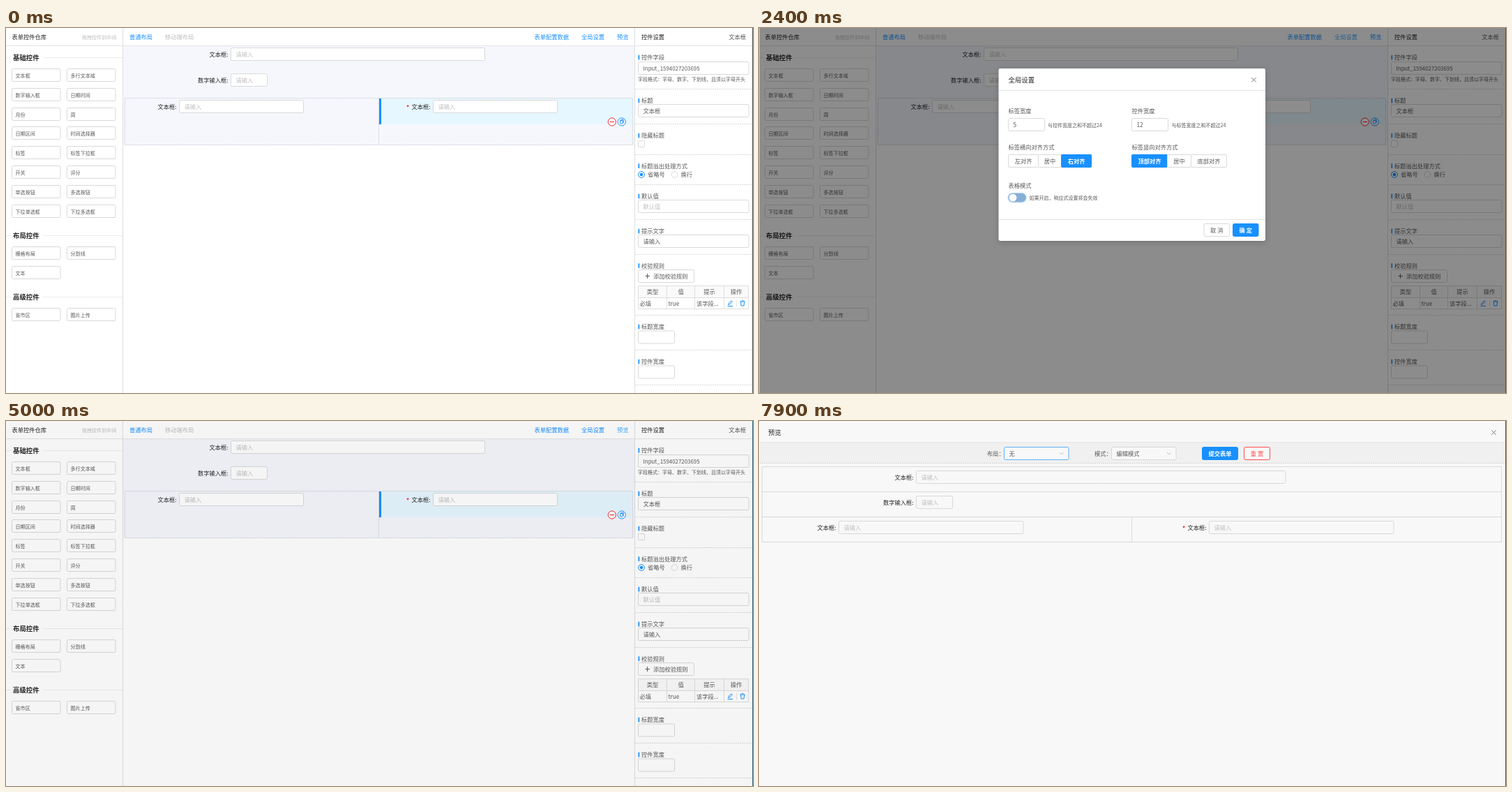
An HTML page with a canvas that plays this animation: 1071 px wide and 523 px high, repeating every 8000 ms.

```html
<!DOCTYPE html>
<html lang="zh-CN">
<head>
<meta charset="utf-8">
<title>表单设计器</title>
<style>
  html, body { margin: 0; width: 100%; height: 100%; overflow: hidden; background: #fff; }
  canvas { display: block; }
</style>
</head>
<body>
<canvas id="stage" width="1071" height="523"></canvas>
<script>
const W = 1071, H = 523, LOOP = 8000, STEP = 100;
const FONT = "'Noto Sans CJK SC','Noto Sans CJK','Noto Sans',sans-serif";
const BLUE = '#1890ff', RED = '#f5222d', BORDER = '#d9d9d9', LINE = '#e4e4e4';
const DARK = '#262626', TEXT = '#595959', HINT = '#bfbfbf';

const screen2d = document.getElementById('stage').getContext('2d');
const layer = Object.assign(document.createElement('canvas'), { width: W, height: H });
const layer2d = layer.getContext('2d');
let g = screen2d;

const clamp = v => Math.max(0, Math.min(1, v));
const bezier = (a, b, u) => 3 * (1 - u) ** 2 * u * a + 3 * (1 - u) * u * u * b + u ** 3;

// Ease-out-circ, cubic-bezier(.08, .82, .17, 1)
function easeOutCirc(x) {
  if (x <= 0 || x >= 1) return clamp(x);
  let lo = 0, hi = 1;
  for (let i = 0; i < 24; i++) {
    const mid = (lo + hi) / 2;
    if (bezier(.08, .17, mid) < x) lo = mid; else hi = mid;
  }
  return bezier(.82, 1, lo);
}

function mix(a, b, p) {
  const part = (hex, i) => parseInt(hex.slice(i, i + 2), 16);
  return `rgb(${[1, 3, 5].map(i => Math.round(part(a, i) + (part(b, i) - part(a, i)) * p))})`;
}

// Value of the latest [time, value] entry that has begun
const held = (t, keys) => keys.reduce((v, [at, next]) => t >= at ? next : v, 0);

function text(str, x, y, { size = 8.26, color = TEXT, align = 'left', weight = 400 } = {}) {
  g.font = `${weight} ${size}px ${FONT}`;
  g.fillStyle = color;
  g.textAlign = align;
  g.fillText(str, x, y + size * .38);
}

function rect(x, y, w, h, color) {
  g.fillStyle = color;
  g.fillRect(x, y, w, h);
}

function box(x, y, w, h, stroke = BORDER, fill, r = 2) {
  g.beginPath();
  g.roundRect(x, y, w, h, r);
  if (fill) { g.fillStyle = fill; g.fill(); }
  if (stroke) { g.strokeStyle = stroke; g.stroke(); }
}

function path(points, color, dash = []) {
  g.strokeStyle = color;
  g.setLineDash(dash);
  g.beginPath();
  points.forEach(([x, y]) => g.lineTo(x, y));
  g.stroke();
  g.setLineDash([]);
}

const hline = (x1, x2, y, color = LINE, dash) => path([[x1, y], [x2, y]], color, dash);
const vline = (x, y1, y2, color = LINE, dash) => path([[x, y1], [x, y2]], color, dash);

function circle(x, y, r, stroke, fill) {
  g.beginPath();
  g.arc(x, y, r, 0, Math.PI * 2);
  if (fill) { g.fillStyle = fill; g.fill(); }
  if (stroke) { g.strokeStyle = stroke; g.stroke(); }
}

function cross(x, y, r) {
  path([[x - r, y - r], [x + r, y + r]], '#777');
  path([[x - r, y + r], [x + r, y - r]], '#777');
}

function field(x, y, w, value, { color = TEXT, border = BORDER, fill = '#fff', pad = 7 } = {}) {
  box(x, y, w, 18, border, fill);
  if (value) text(value, x + pad, y + 9.5, { color });
}

// Label, colon and an empty input
function formItem(label, x, y, w, { required, border, fill } = {}) {
  text(label + ':', x - 4, y + 9, { color: DARK, align: 'right' });
  if (required) text('*', x - 38.5, y + 10, { color: RED, weight: 700 });
  field(x, y, w, '请输入', { color: HINT, border, fill });
}

function button(label, x, y, w, { color = TEXT, border = BORDER, fill = '#fff', h = 18, weight } = {}) {
  box(x, y, w, h, border, fill);
  text(label, x + w / 2, y + h / 2 + .3, { color, weight, align: 'center' });
}

function buttonGroup(labels, edges, y, active) {
  labels.forEach((label, i) => {
    const on = i === active;
    box(edges[i], y, edges[i + 1] - edges[i], 18, on ? BLUE : BORDER, on ? BLUE : '#fff', 1);
    text(label, (edges[i] + edges[i + 1]) / 2, y + 9.3,
      { color: on ? '#fff' : TEXT, align: 'center', weight: on ? 700 : 400 });
  });
}

const GROUPS = [
  ['基础控件', 42, 68, ['文本框', '多行文本域', '数字输入框', '日期时间', '月份', '周', '日期区间', '时间选择器',
    '标签', '标签下拉框', '开关', '评分', '单选按钮', '多选按钮', '下拉单选框', '下拉多选框']],
  ['布局控件', 297, 323, ['栅格布局', '分割线', '文本']],
  ['高级控件', 385, 411, ['省市区', '图片上传']]
];

function drawPalette() {
  text('表单控件仓库', 8.5, 13, { color: DARK, weight: 500 });
  text('拖拽控件到中间', 158.5, 13, { size: 7.08, color: HINT, align: 'right' });
  for (const [title, y, top, items] of GROUPS) {
    hline(0, 7, y + .5, '#ececec');
    hline(53, 167, y + .5, '#ececec');
    text(title, 10, y, { size: 9.4, color: DARK, weight: 700 });
    items.forEach((name, i) => {
      const x = i % 2 ? 87.5 : 8.5;
      const cy = Math.round(top + (i >> 1) * 27.8);
      box(x, cy - 9.5, 69.5, 18);
      text(name, x + 5, cy + .8, { size: 7.08 });
    });
  }
}

function drawCanvas(t) {
  const link = p => ({ color: mix(BLUE, '#40a9ff', p) });
  text('普通布局', 177, 13, link(0));
  text('移动端布局', 228, 13, { color: HINT });
  text('表单配置数据', 757.5, 13, link(held(t, [[4300, 1], [4600, 0]])));
  text('全局设置', 825, 13,
    link(held(t, [[600, .6], [700, 1], [3400, 0], [4100, 1], [4300, 0], [4600, 1], [4800, 0]])));
  text('预览', 876, 13, link(held(t, [[4800, 1]])));

  rect(168, 26, 733, 141.5, '#f5f7fd');
  rect(535, 101, 363, 37, '#e6f7ff');
  rect(535, 101, 3, 37, BLUE);
  path([[170.5, 100.5], [898.5, 100.5], [898.5, 167.5], [170.5, 167.5], [170.5, 100.5]], '#cfd2d8', [2, 1]);
  vline(534.5, 101, 167, '#cfd2d8', [2, 1]);
  formItem('文本框', 322.5, 28.5, 364);
  formItem('数字输入框', 322.5, 65.5, 52);
  formItem('文本框', 248.5, 103.5, 178);
  formItem('文本框', 612.5, 103.5, 178, { required: true });

  circle(868.8, 134.5, 5.6, RED, '#fff');
  hline(866, 872, 134.5, RED);
  circle(882.8, 134.5, 5.6, BLUE, '#fff');
  box(880.5, 132.5, 3.5, 4.5, BLUE, null, .5);
  path([[881.5, 131.3], [885.3, 131.3], [885.3, 136]], BLUE);
}

function drawSettings() {
  text('控件设置', 911, 13, { color: DARK, weight: 500 });
  text('文本框', 1061, 13, { align: 'right' });
  const sections = [['控件字段', 42], ['标题', 104], ['隐藏标题', 154], ['标题溢出处理方式', 197.5], ['默认值', 241],
    ['提示文字', 291], ['校验规则', 340.5], ['标题宽度', 428], ['控件宽度', 478]];
  for (const [name, y] of sections) {
    rect(906.5, y - 3.2, 1.7, 6.6, BLUE);
    text(name, 911, y);
  }
  for (const y of [87, 137, 181, 224, 274, 324, 411, 461, 511]) hline(902, 1070, y + .5, '#dcdcdc', [2, 1]);

  field(906.5, 48.5, 158.5, '');
  text('Input_1594027203695', 913.5, 57.8, { size: 7.9 });
  text('字段格式：字母、数字、下划线，且须以字母开头', 906, 73, { size: 7 });
  field(906.5, 109.5, 158.5, '文本框');
  box(906.5, 161.5, 9, 9, BORDER, '#fff', 1);
  circle(911, 210, 4.4, BLUE, '#fff');
  circle(911, 210, 2.3, null, BLUE);
  text('省略号', 920, 210);
  circle(958.5, 210, 4.4, BORDER, '#fff');
  text('换行', 967.5, 210);
  field(906.5, 246.5, 158.5, '默认值', { color: HINT });
  field(906.5, 296.5, 158.5, '请输入');

  box(906.5, 346.5, 80, 18, BORDER, '#fff');
  hline(916.5, 923, 355.5, TEXT);
  vline(919.5, 352, 359, TEXT);
  text('添加校验规则', 928, 355.8);

  rect(907, 370, 158, 16, '#fafafa');
  for (const y of [369.5, 386.5, 402.5]) hline(906.5, 1065, y, '#dedede');
  for (const x of [906.5, 947.5, 987.5, 1029.5, 1064.5]) vline(x, 369.5, 402.5, '#dedede');
  vline(1047.5, 390, 399);
  [['类型', 927], ['值', 967.5], ['提示', 1008.5], ['操作', 1047]]
    .forEach(([s, x]) => text(s, x, 378.3, { align: 'center' }));
  [['必填', 908.5], ['true', 949.5], ['该字段...', 990]].forEach(([s, x]) => text(s, x, 394.5));
  path([[1035.5, 396.5], [1036, 394.5], [1040, 390.8], [1041.3, 392.2], [1037.5, 396], [1035.5, 396.5]], BLUE);
  hline(1034.5, 1042, 398.5, BLUE);
  hline(1052.3, 1059.7, 392, BLUE);
  path([[1053.5, 392], [1054, 398], [1058, 398], [1058.5, 392]], BLUE);
  hline(1054.5, 1057.5, 390.8, BLUE);

  field(906.5, 434, 52);
  field(906.5, 484, 52);
}

function drawDesigner(t) {
  rect(0, 0, W, H, '#fff');
  drawPalette();
  drawCanvas(t);
  drawSettings();
  hline(0, 1070, 25.5);
  vline(167.5, 0, H, '#dedede');
  vline(901.5, 0, H, '#dedede');
}

function drawSwitch(t) {
  const on = held(t, [[2400, .35], [2500, .75], [2600, .95], [2700, 1]]);
  const slide = held(t, [[2500, .6], [2600, .95], [2700, 1]]);
  if (on) box(356, 235.8, 28, 14.6, null, 'rgba(24,144,255,.2)', 7.3);
  box(357.3, 236.8, 25.6, 12.6, null, mix('#bfbfbf', BLUE, on), 6.3);
  circle(364 + 12.6 * slide, 243.1, 5.4, null, '#fff');
}

function drawSettingsModal(t) {
  g.save();
  g.shadowColor = 'rgba(0,0,0,.18)';
  g.shadowBlur = 8;
  g.shadowOffsetY = 2;
  box(343.5, 58, 382.5, 247, null, '#fff', 2.4);
  g.restore();
  text('全局设置', 357.5, 74, { size: 9.4, color: DARK });
  cross(709.5, 74.3, 3.2);
  hline(344, 726, 89.5);
  hline(344, 726, 274.5);

  const hint = { size: 7 };
  text('标签宽度', 357.5, 119);
  field(357.5, 129.5, 52, '5');
  text('与控件宽度之和不超过24', 414, 139, hint);
  text('控件宽度', 534.5, 119);
  field(534.5, 129.5, 52, '12');
  text('与标签宽度之和不超过24', 591.5, 139, hint);
  text('标签横向对齐方式', 357.5, 171);
  buttonGroup(['左对齐', '居中', '右对齐'], [357.5, 400.5, 433.5, 476.5], 181.5, 2);
  text('标签竖向对齐方式', 534.5, 171);
  buttonGroup(['顶部对齐', '居中', '底部对齐'], [534.5, 585.5, 619.5, 670.5], 181.5, 0);
  text('表格模式', 357.5, 225.5);
  drawSwitch(t);
  text('如果开启，响应式设置将会失效', 387.5, 243, hint);

  const ok = mix(BLUE, '#40a9ff', held(t, [[3000, .6], [3100, 1]]));
  button('取 消', 638, 280.5, 36.5);
  button('确 定', 679.5, 280.5, 36.5, { color: '#fff', border: ok, fill: ok, weight: 700 });
}

function select(label, labelX, x, value, border) {
  text(label, labelX, 46.5);
  field(x, 37.5, 92.5, value, { border, fill: '#f8f8f8' });
  path([[x + 79.5, 45], [x + 82.3, 48], [x + 85.1, 45]], HINT);
}

function drawPreview(t) {
  const paper = '#f8f8f8', grid = '#dadada';
  const hover = p => mix(BORDER, '#40a9ff', p);
  rect(0, 0, 1070, H, paper);
  text('预览', 13, 16, { size: 9.4, color: DARK });
  cross(1053.5, 16.5, 3.2);
  rect(1, 31, 1069, 29, '#f0f0f0');
  hline(1, 1070, 30.5, '#e6e6e6');
  hline(1, 1070, 60.5, '#d4d4d4', [2, 1]);
  select('布局：', 327, 351.5, '无', hover(held(t, [[7900, .8]])));
  select('模式：', 481, 505.5, '编辑模式', BORDER);
  button('提交表单', 635.5, 37.5, 51, { color: '#fff', border: BLUE, fill: BLUE, weight: 700 });
  button('重 置', 695.5, 37.5, 37, { color: '#ff4d4f', border: '#ff4d4f', fill: paper });

  for (const y of [65.5, 101.5, 137.5, 173.5]) hline(4.5, 1065, y, grid);
  for (const x of [4.5, 1064.5]) vline(x, 65.5, 173.5, grid);
  vline(534.5, 137.5, 173.5, grid);
  formItem('文本框', 225.5, 71.5, 529.5, { fill: paper });
  formItem('数字输入框', 225.5, 107.5, 52, { fill: paper });
  formItem('文本框', 114.5, 143.5, 264.5,
    { fill: paper, border: hover(held(t, [[5900, .7], [6000, .4], [6100, 0]])) });
  formItem('文本框', 645.5, 143.5, 264.5,
    { fill: paper, required: true, border: hover(held(t, [[6800, .5], [6900, 1], [7000, .4], [7100, 0]])) });
}

// Draws a whole panel at one opacity, scaled about the point that was clicked
function zoomPanel(draw, t, { x = 0, y = 0, scale = 1, alpha = 1, filter = 'none' }) {
  layer2d.clearRect(0, 0, W, H);
  g = layer2d;
  g.save();
  g.translate(x, y);
  g.scale(scale, scale);
  g.translate(-x, -y);
  draw(t);
  g.restore();
  g = screen2d;
  g.save();
  g.globalAlpha = alpha;
  g.filter = filter;
  g.drawImage(layer, 0, 0);
  g.restore();
}

// Dims the page, then zooms a panel in from the clicked point a moment later
function openPanel(draw, t, start, x, y) {
  mask(.45 * clamp((t - start) / 200));
  const p = easeOutCirc((t - start - 18) / 300);
  if (p > 0) zoomPanel(draw, t, { x, y, scale: .2 + .8 * p, alpha: p });
}

const mask = alpha => rect(.5, 0, 1069.5, H, `rgba(0,0,0,${alpha})`);

function drawScene(t) {
  drawDesigner(t);
  if (t >= 900 && t < 3400) {
    openPanel(drawSettingsModal, t, 833, 846, 14);
  } else if (t >= 3400 && t < 5000) {
    mask(.018);
    zoomPanel(drawSettingsModal, t, { alpha: .07, filter: 'grayscale(1)' });
  } else if (t >= 5000) {
    openPanel(drawPreview, t, 4982, 884, 13);
  }
  rect(1070, 0, 1, H, t < 600 ? '#4a4a4a' : '#2b6079');
}

let shown = -1;
function tick() {
  const t = Math.floor(performance.now() % LOOP / STEP) * STEP;
  if (t !== shown) drawScene(shown = t);
  requestAnimationFrame(tick);
}
tick();
</script>
</body>
</html>
```
